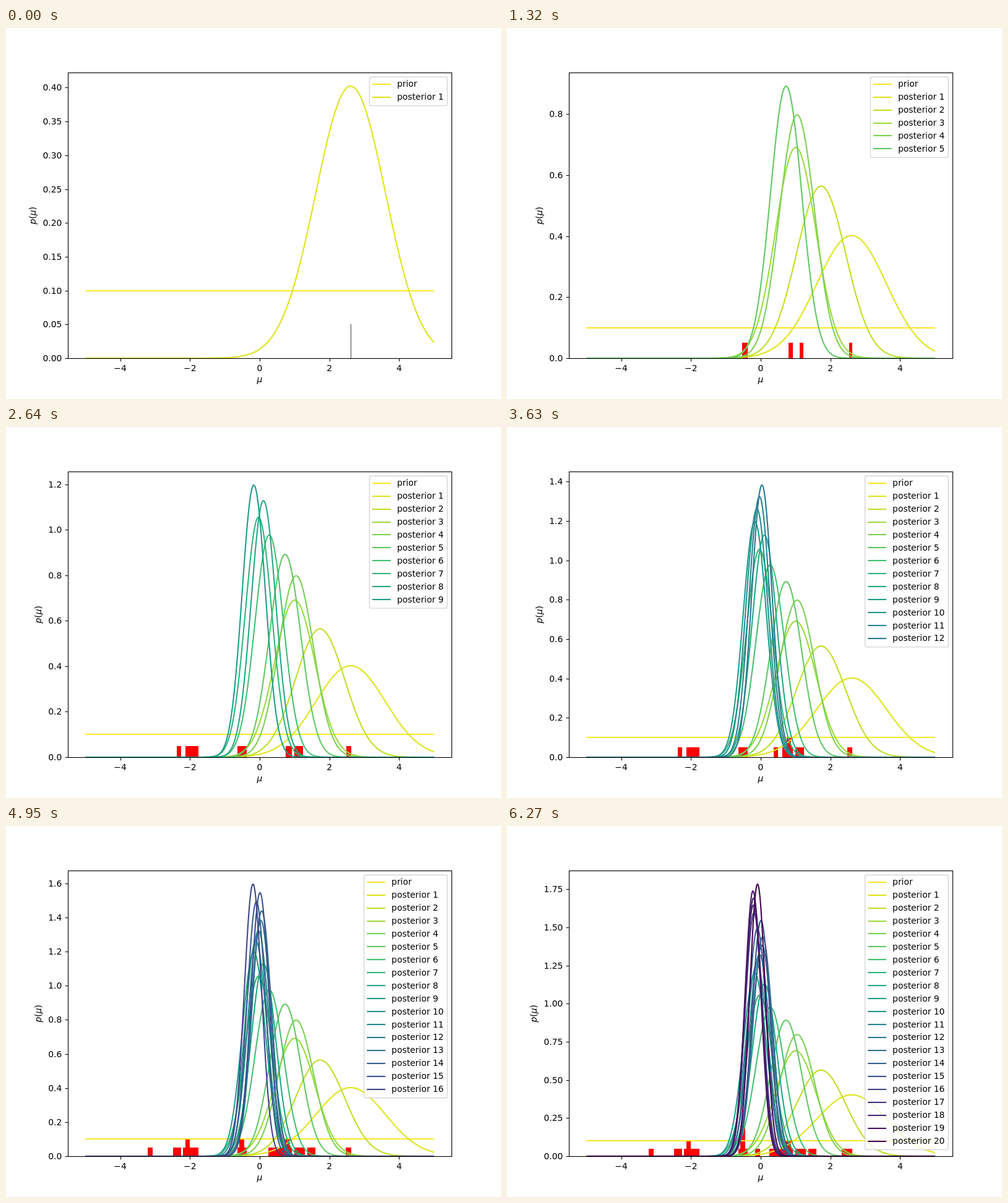
An HTML page with a canvas that plays this animation: 800 px wide and 600 px high, repeating every 6.6 s.

```html
<!DOCTYPE html>
<html lang="en">
<head>
<meta charset="utf-8">
<title>Posterior updates</title>
<style>
  html, body { margin: 0; width: 100%; height: 100%; overflow: hidden; background: #fff; }
  canvas { display: block; }
</style>
</head>
<body>
<canvas id="stage" width="800" height="600"></canvas>
<script>
const ctx = document.getElementById('stage').getContext('2d');
const STEP_MS = 330, BINS = 40, COUNT_HEIGHT = 0.05;
const LEFT = 100, RIGHT = 720, TOP = 72, BOTTOM = 534;
const FONT = '13.89px "DejaVu Sans", sans-serif';

const samples = [2.608, 0.855, -0.451, 1.165, -0.532, -2.005, -1.87, 1.09, -2.378, 0.435,
  0.69, 0.81, 0.33, -2.09, 1.47, -3.212, -0.52, -0.08, -0.52, 2.39];
const colors = ('fde725 dfe318 bddf26 9bd93c 7ad151 5ec962 44bf70 2fb47c 22a884 1e9c89 21918c ' +
  '25848e 2a788e 2f6c8e 355f8d 3b528b 414487 46327e 482475 471365 440154')
  .split(' ').map(hex => '#' + hex);

const grid = Array.from({ length: 1001 }, (_, i) => -5 + i / 100);
const toX = mu => 410 + mu * 620 / 11;

// Flat prior, then the normalised posterior after each sample
const curves = [grid.map(() => 0.1)];
let total = 0;
samples.forEach((value, i) => {
  const n = i + 1;
  total += value;
  const raw = grid.map(mu => Math.exp(-n * (mu - total / n) ** 2 / 2));
  const area = raw.reduce((a, b) => a + b) / 100;
  curves.push(raw.map(v => v / area));
});

const histograms = samples.map((_, i) => {
  const seen = samples.slice(0, i + 1);
  let lo = Math.min(...seen), hi = Math.max(...seen);
  if (lo === hi) { lo -= 0.5; hi += 0.5; }
  const width = (hi - lo) / BINS, counts = new Map();
  for (const v of seen) {
    const bin = Math.min(BINS - 1, Math.floor((v - lo) / width + 1e-9));
    counts.set(bin, (counts.get(bin) || 0) + 1);
  }
  return [...counts].map(([bin, count]) =>
    ({ from: lo + bin * width, to: lo + (bin + 1) * width, count }));
});

function line(x1, y1, x2, y2, color, width) {
  ctx.strokeStyle = color;
  ctx.lineWidth = width;
  ctx.beginPath();
  ctx.moveTo(x1, y1);
  ctx.lineTo(x2, y2);
  ctx.stroke();
}

function text(str, x, y, align = 'left', style = '') {
  ctx.font = style + ' ' + FONT;
  ctx.textAlign = align;
  ctx.fillStyle = '#000';
  ctx.fillText(str, x, y);
}

function drawData(n, toY) {
  ctx.save();
  ctx.beginPath();
  ctx.rect(LEFT, TOP, RIGHT - LEFT, BOTTOM - TOP + 0.5);
  ctx.clip();
  ctx.fillStyle = n === 1 ? '#444' : '#f00';
  for (const bars of histograms.slice(0, n)) {
    for (const { from, to, count } of bars) {
      const x = Math.round(toX(from)), y = Math.round(toY(count * COUNT_HEIGHT));
      ctx.fillRect(x, y, Math.round(toX(to)) - x, BOTTOM - y);
    }
  }
  ctx.lineWidth = 2.08;
  ctx.lineJoin = 'round';
  curves.slice(0, n + 1).forEach((curve, k) => {
    ctx.strokeStyle = colors[k];
    ctx.beginPath();
    curve.forEach((p, i) => ctx.lineTo(toX(grid[i]), k ? toY(p) : Math.round(toY(p))));
    ctx.stroke();
  });
  ctx.restore();
}

function drawAxes(yMax, toY) {
  ctx.strokeStyle = '#000';
  ctx.lineWidth = 1.11;
  ctx.strokeRect(LEFT + 0.5, TOP + 0.5, RIGHT - LEFT, BOTTOM - TOP);

  for (let mu = -4; mu <= 4; mu += 2) {
    const x = Math.round(toX(mu));
    line(x + 0.5, BOTTOM + 0.5, x + 0.5, BOTTOM + 5.4, '#000', 1.11);
    text(String(mu).replace('-', '\u2212'), toX(mu), 555, 'center');
  }
  text('μ', 410, 573, 'center', 'oblique');

  const step = [0.05, 0.1, 0.2, 0.25].find(s => s >= yMax / 9);
  const digits = step === 0.05 || step === 0.25 ? 2 : 1;
  for (let i = 0; i * step <= yMax; i++) {
    const y = Math.round(toY(i * step));
    line(LEFT + 0.5, y + 0.5, LEFT - 4.4, y + 0.5, '#000', 1.11);
    text((i * step).toFixed(digits), 90.3, y + 5, 'right');
  }

  ctx.save();
  ctx.translate(digits === 2 ? 47.5 : 56.5, 303);
  ctx.rotate(-Math.PI / 2);
  let x = -14.5;
  for (const ch of 'p(μ)') {
    text(ch, x, 0, 'left', /[()]/.test(ch) ? '' : 'oblique');
    x += ctx.measureText(ch).width;
  }
  ctx.restore();
}

function drawLegend(n) {
  const left = n < 10 ? 587.4 : 578.6;
  ctx.beginPath();
  ctx.roundRect(left, 79.3, 713.3 - left, 4.4 + 20.94 * (n + 1), 2.8);
  ctx.fillStyle = 'rgba(255,255,255,0.8)';
  ctx.fill();
  ctx.strokeStyle = 'rgba(204,204,204,0.8)';
  ctx.lineWidth = 1.39;
  ctx.stroke();
  for (let k = 0; k <= n; k++) {
    const y = Math.round(90.7 + 20.94 * k);
    line(left + 4.6, y, left + 34.4, y, colors[k], 2.08);
    text(k ? 'posterior ' + k : 'prior', left + 44.5, Math.round(95.2 + 20.94 * k));
  }
}

function draw(n) {
  const yMax = 1.05 * Math.max(...curves.slice(0, n + 1).flat());
  const toY = p => BOTTOM - p / yMax * (BOTTOM - TOP);
  ctx.fillStyle = '#fff';
  ctx.fillRect(0, 0, 800, 600);
  drawData(n, toY);
  drawAxes(yMax, toY);
  drawLegend(n);
}

let shown = 0;
const start = performance.now();
function tick() {
  const elapsed = Math.max(0, performance.now() - start);
  const n = 1 + Math.floor(elapsed / STEP_MS) % samples.length;
  if (n !== shown) draw(shown = n);
  requestAnimationFrame(tick);
}
tick();
</script>
</body>
</html>
```
